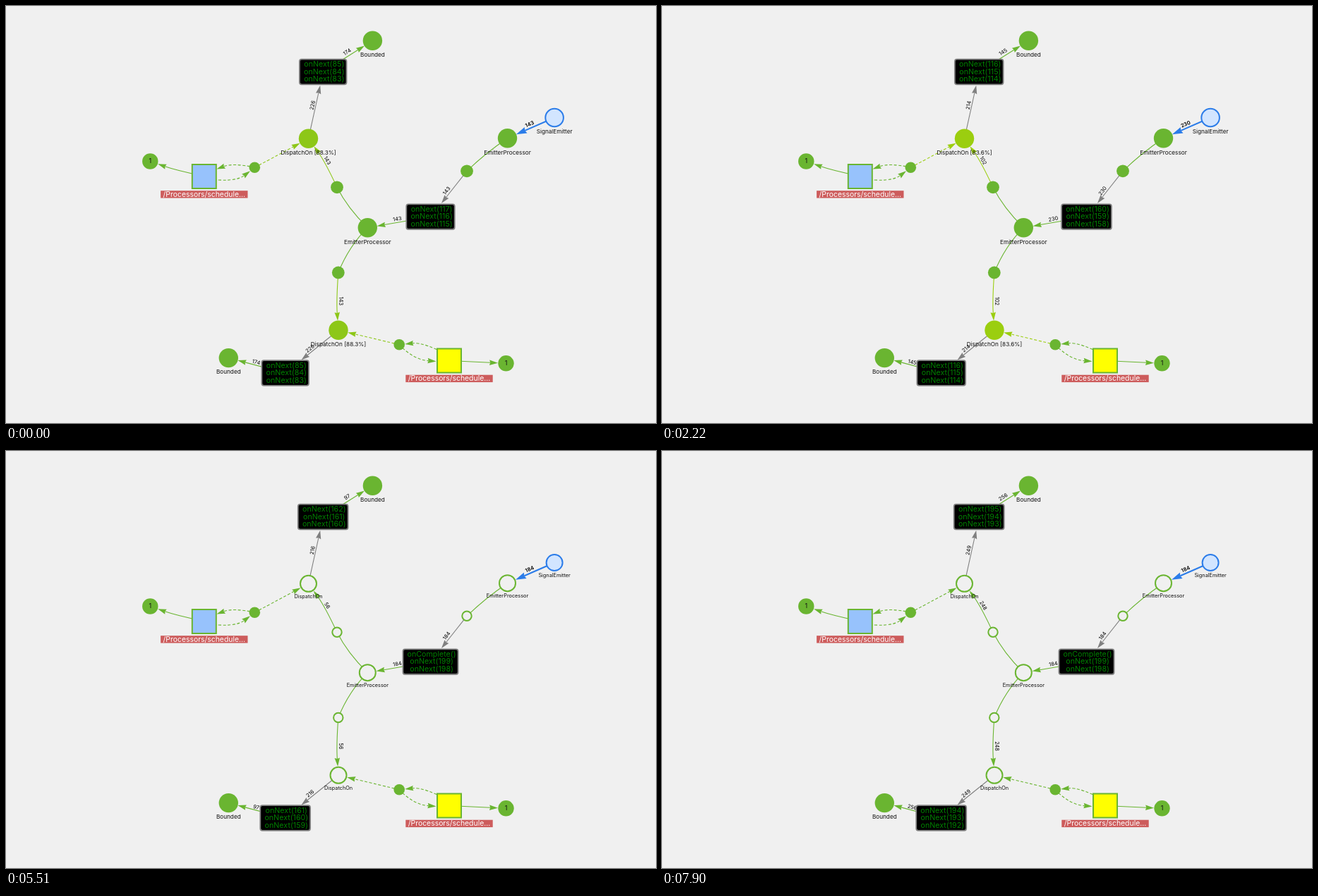
An HTML page with a canvas that plays this animation: 921x592 px, repeating every 8000 ms.

```html
<!DOCTYPE html>
<html>
<head>
<meta charset="utf-8">
<style>
  html, body { margin: 0; width: 100%; height: 100%; overflow: hidden; background: #f0f0f0; }
  canvas { display: block; }
</style>
</head>
<body>
<canvas id="stage" width="921" height="592"></canvas>
<script>
const ctx = document.getElementById('stage').getContext('2d');
const LOOP = 8000, TICK = 149, COMPLETE_TICK = 31;
const BG = '#f0f0f0', GREEN = '#6ab531', GRAY = '#808080', BLUE = '#2b7ce9', INK = '#111';
const BOUNDED_CREDIT = [[0, 174], [9, 158], [22, 130], [30, 114], [37, 97], [47, 75], [51, 66], [52, 256]];

const NODES = {
  upperBounded: [519.4, 49.3], lowerBounded: [315.3, 499.6],
  upperBox: [449.2, 93.5], sourceBox: [601.5, 299.2], lowerBox: [395.7, 521],
  upperDispatch: [428.5, 188.3], lowerDispatch: [471, 460.3],
  upperInner: [469, 257.3], lowerInner: [470.8, 378.5], sourceInner: [653, 234.3],
  hub: [512.3, 314.7], processor: [710.5, 187.7], emitter: [777.1, 158.5],
  upperScheduler: [280.8, 242], lowerScheduler: [628, 503.5],
  upperWorker: [352.3, 229.3], lowerWorker: [557.2, 480.7],
  upperCount: [204.3, 220.5], lowerCount: [708.5, 507.3]
};

function interpolate(points, k) {
  for (let i = 1; i < points.length; i++) {
    const [k0, v0] = points[i - 1], [k1, v1] = points[i];
    if (k < k1) return Math.round(v0 + (v1 - v0) * (k - k0) / (k1 - k0));
  }
  return points[points.length - 1][1];
}

function setFont(size, weight) {
  ctx.font = `${weight} ${size}px Inter, "Open Sans", sans-serif`;
}

function text(string, x, y, size = 8.2, color = INK, weight = 400, degrees = 0) {
  ctx.save();
  ctx.translate(x, y);
  ctx.rotate(degrees * Math.PI / 180);
  setFont(size, weight);
  ctx.textAlign = 'center';
  ctx.textBaseline = 'middle';
  ctx.fillStyle = color;
  ctx.fillText(string, 0, 0);
  ctx.restore();
}

const edgeLabel = (value, x, y, degrees, weight = 400) =>
  text(value, x, y, 7.4, '#000', weight, degrees);

// Curve bent towards `control`; the tip stops `gap` short of the end point.
function edge([x0, y0], [cx, cy], [x1, y1], gap, color = GREEN, { dash = false, width = 1.1, arrow = 12 } = {}) {
  const angle = Math.atan2(y1 - cy, x1 - cx);
  const back = d => [x1 - (gap + d) * Math.cos(angle), y1 - (gap + d) * Math.sin(angle)];
  ctx.strokeStyle = ctx.fillStyle = color;
  ctx.lineWidth = width;
  ctx.setLineDash(dash ? [4, 2.6] : []);
  ctx.beginPath();
  ctx.moveTo(x0, y0);
  ctx.quadraticCurveTo(cx, cy, ...back(arrow * 0.9));
  ctx.stroke();
  ctx.setLineDash([]);
  if (!arrow) return;
  ctx.save();
  ctx.translate(...back(0));
  ctx.rotate(angle);
  ctx.beginPath();
  ctx.moveTo(0, 0);
  ctx.lineTo(-arrow, arrow * 0.31);
  ctx.lineTo(-arrow * 0.9, 0);
  ctx.lineTo(-arrow, -arrow * 0.31);
  ctx.fill();
  ctx.restore();
}

function line(from, to, gap, color, options) {
  edge(from, [(from[0] + to[0]) / 2, (from[1] + to[1]) / 2], to, gap, color, options);
}

function disc([x, y], r, fill, border) {
  ctx.beginPath();
  ctx.arc(x, y, border ? r - 1 : r, 0, 2 * Math.PI);
  ctx.fillStyle = fill;
  ctx.fill();
  if (!border) return;
  ctx.strokeStyle = border;
  ctx.lineWidth = 2;
  ctx.stroke();
}

function terminal([x, y], lines) {
  setFont(10.7, 400);
  const w = Math.max(...lines.map(s => ctx.measureText(s).width)) + 9;
  ctx.beginPath();
  ctx.roundRect(x - w / 2, y - 17.8, w, 35.6, 3);
  ctx.fillStyle = '#000';
  ctx.fill();
  ctx.strokeStyle = GRAY;
  ctx.lineWidth = 1.8;
  ctx.stroke();
  lines.forEach((s, i) => text(s, x + 1.6, y + (i - 1) * 10.3, 10.7, '#008000'));
}

const signals = n => [n, n - 1, n - 2].map(i => `onNext(${i})`);

function scheduler([x, y], fill) {
  ctx.fillStyle = fill;
  ctx.strokeStyle = GREEN;
  ctx.lineWidth = 2;
  ctx.fillRect(x - 17, y - 17, 34, 34);
  ctx.strokeRect(x - 17, y - 17, 34, 34);
  ctx.fillStyle = '#cd5c5c';
  ctx.fillRect(x - 61.7, y + 20.2, 123.4, 10.4);
  text('/Processors/schedule...', x, y + 25.5, 10.4, '#fff');
}

function stateAt(k) {
  const emitted = 117 + Math.floor(2.88 * Math.min(k, COMPLETE_TICK));
  const refilled = emitted >= 134;
  return {
    done: k >= COMPLETE_TICK,
    supply: (refilled ? 390 : 260) - emitted,
    branch: k >= 52 ? 248 : (refilled ? 262 : 260) - emitted,
    capacity: k < COMPLETE_TICK
      ? Math.ceil(226 - 0.8 * k)
      : Math.min(249, Math.round(216 + 2.2 * (k - 37))),
    credit: interpolate(BOUNDED_CREDIT, k),
    source: emitted < 200 ? signals(emitted) : ['onComplete()', 'onNext(199)', 'onNext(198)'],
    upper: signals(85 + Math.floor(2.06 * k + 0.9)),
    lower: signals(85 + Math.floor(2.06 * k + 0.57))
  };
}

function drawEdges(s, load, r) {
  const n = NODES, dashed = { dash: true }, plain = { arrow: 0 };

  line(n.upperBox, n.upperBounded, 13.5);
  line(n.upperDispatch, [445.2, 112.7], 0, GRAY);
  edge(n.upperInner, [452, 221], n.upperDispatch, r, load);
  edge(n.hub, [484, 287], n.upperInner, 0, GREEN, plain);
  edge(n.hub, [486, 341], n.lowerInner, 0, GREEN, plain);
  edge(n.lowerInner, [468, 418], n.lowerDispatch, r, load);
  line(n.sourceBox, n.hub, r);
  line(n.sourceInner, [617, 280], 0, GRAY);
  edge(n.processor, [679, 209], n.sourceInner, 0, GREEN, plain);
  line(n.emitter, n.processor, r, BLUE, { width: 2, arrow: 15 });
  line(n.lowerBox, n.lowerBounded, 13.5);
  line(n.lowerDispatch, [418.5, 502.5], 0, GRAY);

  edge(n.upperScheduler, [239, 232.5], n.upperCount, 11.5);
  edge(n.upperWorker, [323, 222.5], [298.5, 231.5], 0, GREEN, dashed);
  edge([281, 245], [324, 251], n.upperWorker, 8, GREEN, dashed);
  line(n.upperWorker, n.upperDispatch, r, load, dashed);
  edge([628, 497], [593, 477], n.lowerWorker, 8, GREEN, dashed);
  edge(n.lowerWorker, [577, 502], [609.5, 504.5], 0, GREEN, dashed);
  line(n.lowerWorker, n.lowerDispatch, r, load, dashed);
  line(n.lowerScheduler, n.lowerCount, 11.5);

  edgeLabel(s.credit, 483.5, 65.5, -32);
  edgeLabel(s.capacity, 434.5, 141, -78);
  edgeLabel(s.branch, 455, 219.5, 60);
  edgeLabel(s.branch, 474, 419, 90);
  edgeLabel(s.supply, 554.5, 302.5, -10);
  edgeLabel(s.supply, 624.5, 262.5, -52);
  edgeLabel(s.supply, 742, 168, -23.5, 600);
  edgeLabel(s.credit, 354.5, 505.8, 14);
  edgeLabel(s.capacity, 431, 486.5, -39);
}

function drawNodes(s, load) {
  const n = NODES;
  // Completed nodes shrink to hollow rings.
  const stage = (node, radius, color) =>
    s.done ? disc(node, radius - 1.2, BG, GREEN) : disc(node, radius, color);
  const stageLabel = (name, [x, y]) =>
    text(name, x, y + (s.done ? 18.5 : 20.5), s.done ? 7.3 : 8.2);

  for (const node of [n.upperBounded, n.lowerBounded]) {
    disc(node, 13.7, GREEN);
    text('Bounded', node[0], node[1] + 20.3);
  }
  for (const node of [n.upperCount, n.lowerCount]) {
    disc(node, 11.2, GREEN);
    text('1', ...node, 9);
  }
  disc(n.upperWorker, 7.8, GREEN);
  disc(n.lowerWorker, 7.8, GREEN);
  scheduler(n.upperScheduler, '#97c2fc');
  scheduler(n.lowerScheduler, '#ffff00');

  for (const node of [n.upperInner, n.lowerInner, n.sourceInner])
    stage(node, 8.9, GREEN);

  const dispatch = s.done ? 'DispatchOn' : `DispatchOn [${(s.capacity / 2.56).toFixed(1)}%]`;
  for (const node of [n.upperDispatch, n.lowerDispatch]) {
    stage(node, 13.7, load);
    stageLabel(dispatch, node);
  }
  for (const node of [n.hub, n.processor]) {
    stage(node, 13.7, GREEN);
    stageLabel('EmitterProcessor', node);
  }
  disc(n.emitter, s.done ? 12.5 : 13.8, '#d2e5ff', BLUE);
  stageLabel('SignalEmitter', n.emitter);

  terminal(n.upperBox, s.upper);
  terminal(n.sourceBox, s.source);
  terminal(n.lowerBox, s.lower);
}

function draw(time) {
  const k = Math.floor((time % LOOP + 15) / TICK);
  const s = stateAt(k);
  const used = 1 - s.capacity / 256;
  const load = s.done ? GREEN
    : `rgb(${106 + 300 * used}, ${181 + 150 * used}, ${Math.max(0, 49 - 210 * used)})`;
  ctx.fillStyle = BG;
  ctx.fillRect(0, 0, 921, 592);
  drawEdges(s, load, s.done ? 12.5 : 13.5);
  drawNodes(s, load);
}

const start = performance.now();
function frame() {
  draw(performance.now() - start);
  requestAnimationFrame(frame);
}
frame();
</script>
</body>
</html>
```
